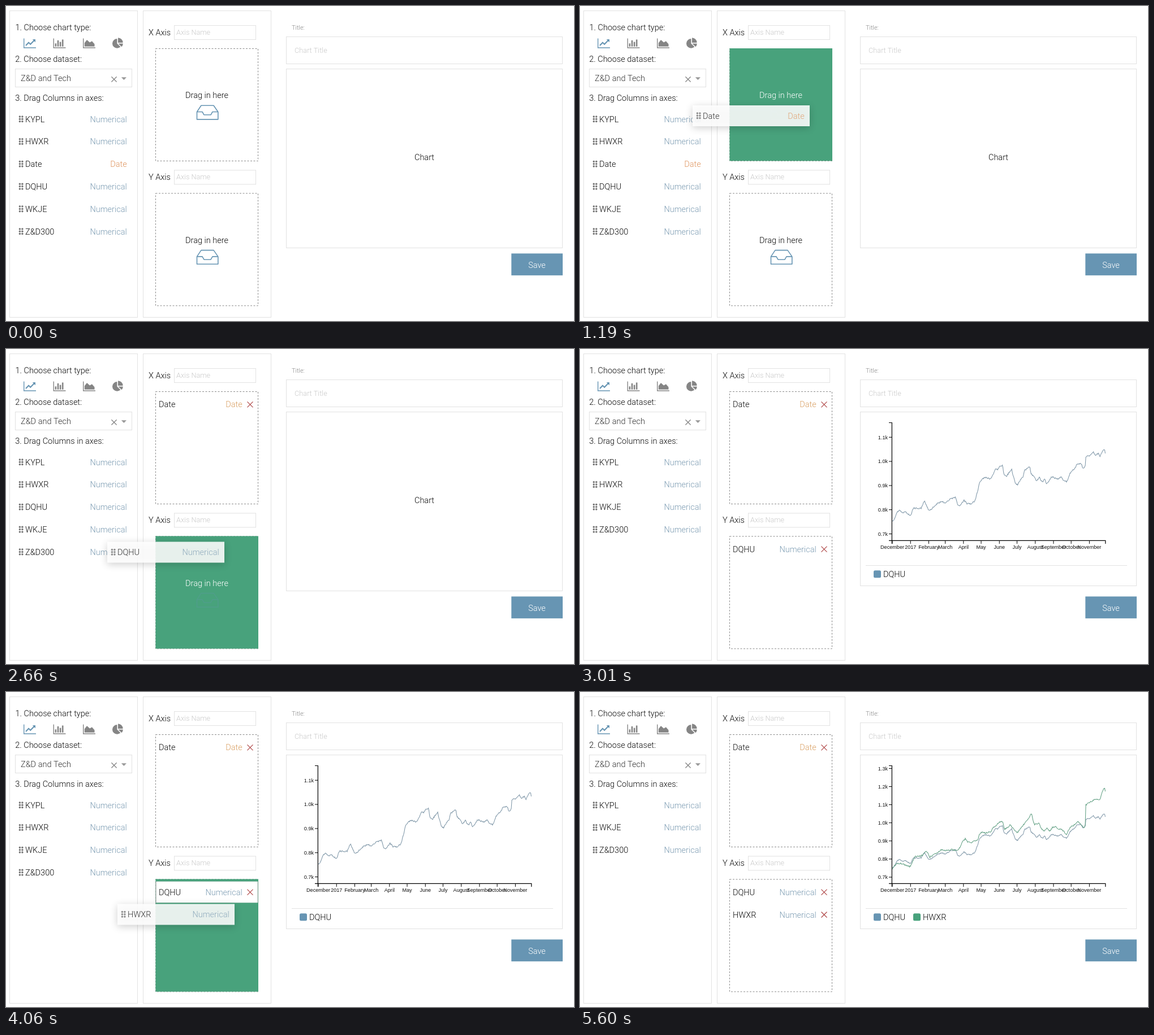
These frames come from a looping animation (1004 px wide and 558 px high, 5.67 s). An HTML page with a canvas:

```html
<!DOCTYPE html>
<html lang="en">
<head>
<meta charset="utf-8">
<title>Chart builder</title>
<style>
  html, body { margin: 0; width: 100%; height: 100%; overflow: hidden; background: #fff; }
  canvas { display: block; width: 1004px; height: 558px; }
</style>
</head>
<body>
<canvas id="stage" width="1004" height="558"></canvas>
<script>
const LOOP = 5670, STEP = 70;
const BLUE = '#6795b3', GREEN = '#48a27c', GRAY = '#858585', LINE = '#e2e2e2', INK = '#0c0c0c';
const NUM = '#7b9bb2', DATE = '#df955f', HINT = '#c9c9c9';
const ctx = document.getElementById('stage').getContext('2d');

const columns = ['KYPL', 'HWXR', 'Date', 'DQHU', 'WKJE', 'Z&D300'];
const ROW = { x: 16, y: 200.5, pitch: 39.8, w: 207, h: 37 };

// path: time, left, row centre; enter: drop zone lights up; drop: preview goes; done: data updates
const drags = [
  { name: 'Date', zone: 0, enter: 1050, drop: 1470, done: 1540,
    path: [[910, 16, 280], [1050, 112, 238], [1190, 199, 194.5], [1330, 234, 172], [1470, 242, 168]] },
  { name: 'DQHU', zone: 1, enter: 2520, drop: 2870, done: 2940,
    path: [[2240, 16, 280], [2380, 56, 300], [2520, 128, 336], [2660, 179, 360], [2800, 222, 388], [2870, 228, 392]] },
  { name: 'HWXR', zone: 1, enter: 3920, drop: 4340, done: 4480,
    path: [[3570, 16, 240.5], [3710, 56, 278], [3850, 112, 324.5], [3990, 176, 376], [4130, 218, 412], [4340, 230, 420]] }
];

// Curve points: x, y inside the plot
const blueCurve = [
  552,306, 556,300, 560,289, 565,286, 570,290, 576,289, 582,294, 584,296, 589,282, 603,282, 609,268, 613,279,
  617,287, 625,280, 633,273, 640,270, 646,273, 653,267, 664,262, 667,275, 671,278, 679,268, 684,274, 691,274,
  698,270, 703,251, 706,238, 711,231, 716,227, 725,230, 730,223, 734,212, 738,214, 743,207, 747,206, 749,222,
  754,225, 763,213, 766,226, 769,236, 773,241, 778,232, 783,226, 786,215, 795,208, 797,220, 801,225, 807,233,
  812,228, 817,236, 821,230, 825,239, 834,226, 840,229, 847,230, 850,226, 855,233, 861,235, 866,220, 870,216,
  875,211, 879,203, 886,203, 889,211, 893,209, 894,191, 903,188, 907,182, 911,188, 916,185, 919,190, 927,176, 929,189];
const greenCurve = [
  552,315, 556,308, 561,303, 568,304, 574,306, 580,309, 584,309, 588,300, 592,292, 600,291, 606,289, 610,283,
  615,284, 618,293, 624,288, 631,285, 640,279, 648,281, 656,279, 665,281, 669,279, 673,273, 676,266, 681,260,
  685,265, 691,267, 697,264, 703,262, 706,252, 711,248, 717,250, 726,247, 731,240, 736,237, 740,231, 747,229,
  750,243, 756,240, 760,236, 765,241, 773,249, 778,243, 782,238, 787,231, 792,225, 798,215, 801,228, 804,235,
  811,232, 815,242, 820,246, 826,241, 830,247, 835,240, 841,238, 846,243, 851,243, 860,252, 866,240, 873,236,
  880,230, 886,235, 890,240, 893,238, 894,200, 899,196, 905,194, 910,190, 916,190, 919,190, 923,177, 927,169, 929,180];

const clamp = v => Math.max(0, Math.min(1, v));

function at(points, x) {
  let i = 0;
  while (i < points.length - 2 && points[i + 1][0] < x) i++;
  const a = points[i], b = points[i + 1], k = clamp((x - a[0]) / (b[0] - a[0]));
  return a.map((v, j) => v + (b[j] - v) * k);
}

// Daily samples as values in thousands, with a little market noise
function series(flat, base, perUnit, seed) {
  const points = [], out = [];
  for (let i = 0; i < flat.length; i += 2) points.push([flat[i], flat[i + 1]]);
  for (let x = 552; x <= 929; x += 1.04) {
    seed = (seed * 16807) % 2147483647;
    const noise = (seed / 2147483647 - 0.5) * 2.4;
    out.push([x, 0.7 + (base - at(points, x)[1] - noise) / perUnit]);
  }
  return out;
}
const blueData = series(blueCurve, 327.5, 428, 41);
const greenData = series(greenCurve, 328, 321, 77);

function text(s, x, mid, color = INK, size = 14.5, align = 'left', font = '300 $px Roboto, sans-serif') {
  ctx.font = font.replace('$', size);
  ctx.fillStyle = color;
  ctx.textAlign = align;
  ctx.fillText(s, x, mid + size * 0.355);
}

function box(x, y, w, h, color = LINE) {
  ctx.strokeStyle = color;
  ctx.lineWidth = 1;
  ctx.strokeRect(x + 0.5, y + 0.5, w, h);
}

function rect(x, y, w, h, color) {
  ctx.fillStyle = color;
  ctx.fillRect(x, y, w, h);
}

function trace(points, close) {
  ctx.beginPath();
  points.forEach(([x, y]) => ctx.lineTo(x, y));
  if (close) ctx.closePath();
}

function stroke(points, color, width = 1) {
  trace(points);
  ctx.strokeStyle = color;
  ctx.lineWidth = width;
  ctx.stroke();
}

function fill(points, color) {
  trace(points, true);
  ctx.fillStyle = color;
  ctx.fill();
}

function cross(x, y, r, color, width) {
  stroke([[x - r, y - r], [x + r, y + r]], color, width);
  stroke([[x - r, y + r], [x + r, y - r]], color, width);
}

function wedge(x, y, r, from, to) {
  ctx.beginPath();
  ctx.moveTo(x, y);
  ctx.arc(x, y, r, from * Math.PI, to * Math.PI);
  ctx.fill();
}

function chartIcons() {
  [[31, BLUE], [83.5, GRAY], [136, GRAY]].forEach(([x, c]) => stroke([[x + 0.7, 57.5], [x + 0.7, 74], [x + 22, 74]], c, 1.4));
  stroke([[35, 70], [40, 64.8], [43.2, 67.8], [50, 60.8]], BLUE, 2.1);
  fill([[46.8, 59], [52, 59], [52, 64.2]], BLUE);
  [5.5, 11, 8.2, 12.4].forEach((h, i) => rect(86.6 + i * 4.1, 71.8 - h, 2.6, h, GRAY));
  fill([[138.8, 71.8], [138.8, 65.5], [143, 60], [148, 64.5], [152, 62.3], [156.5, 67.5], [156.5, 71.8]], GRAY);
  ctx.fillStyle = GRAY;
  wedge(196.4, 66.4, 8.4, 0.25, 1.5);
  wedge(198.4, 66.4, 8.4, 0, 0.25);
  wedge(198, 64.9, 8.6, 1.5, 2);
}

function tray(y, alpha) {
  ctx.globalAlpha = alpha;
  ctx.lineJoin = 'round';
  stroke([[337.5, y + 12], [345, y + 0.7], [367, y + 0.7], [374.8, y + 12], [374.8, y + 25.4], [337.5, y + 25.4],
    [337.5, y + 12], [347, y + 12], [350, y + 17.3], [362, y + 17.3], [365, y + 12], [374.8, y + 12]], BLUE, 1.6);
  ctx.lineJoin = 'miter';
  ctx.globalAlpha = 1;
}

function columnRow(name, x, mid) {
  ctx.fillStyle = '#777';
  for (let i = 0; i < 6; i++) {
    ctx.beginPath();
    ctx.arc(x + 8.4 + (i % 2) * 4.5, mid - 4.6 + (i >> 1) * 4.3, 1.75, 0, 7);
    ctx.fill();
  }
  const isDate = name === 'Date';
  text(name, x + 18, mid);
  text(isDate ? 'Date' : 'Numerical', x + 197.7, mid, isDate ? DATE : NUM, 14.5, 'right');
}

function leftPanel(used) {
  box(6, 8, 226, 543);
  text('1. Choose chart type:', 16.5, 37.5);
  chartIcons();
  text('2. Choose dataset:', 16.2, 93.7);
  box(16, 111, 206, 32);
  text('Z&D and Tech', 26, 128, '#333');
  cross(191, 129.8, 4.6, '#8a8a8a', 1.4);
  fill([[203.8, 126.3], [213, 126.3], [208.4, 131]], '#999');
  text('3. Drag Columns in axes:', 16.2, 163.3);
  columns.filter(c => !used.includes(c)).forEach((c, i) => columnRow(c, ROW.x, ROW.y + i * ROW.pitch));
}

function zone(label, y, items, hover) {
  text(label, 252, y - 28.5);
  box(297, y - 41, 144, 25);
  text('Axis Name', 301, y - 28.8, HINT, 12.7);

  ctx.setLineDash([3, 2.5]);
  box(264, y, 181, 199, '#8c8c8c');
  ctx.setLineDash([]);
  ctx.globalAlpha = clamp(hover / 100);
  rect(264.4, y, 181.6, 199.4, GREEN);
  ctx.globalAlpha = 1;

  if (!items.length) {
    text('Drag in here', 355, y + 83, hover > 0 ? '#fff' : INK, 14.5, 'center');
    tray(y + 100.5, 1 - clamp(hover / 190));
  }
  items.forEach((name, i) => {
    const mid = y + 23.3 + i * 39.8, isDate = name === 'Date';
    if (hover > 0) {
      rect(264.5, mid - 19, 181, 37.5, '#9a9a9a');
      rect(265.5, mid - 19, 179.3, 37.5, '#fff');
    }
    text(name, 270, mid);
    text(isDate ? 'Date' : 'Numerical', 417.7, mid, isDate ? '#d99f62' : NUM, 14.5, 'right');
    cross(431.5, mid, 5, '#b04848', 1.2);
  });
}

function chart(lines) {
  const two = lines.length > 1, base = two ? 328 : 327.5, unit = two ? 321 : 428;
  const yOf = v => base - (v - 0.7) * unit;
  const label = (s, x, y, align) => text(s, x, y, '#111', 9.1, align, '$px "Liberation Sans", Arial, sans-serif');

  lines.forEach(l => stroke(l.data.map(([x, v]) => [x, yOf(v)]), l.line, 1.05));

  stroke([[546, 130.5], [551.4, 130.5], [551.4, 339.4], [546, 339.4]], '#000', 1.2);
  stroke([[551.4, 345], [551.4, 339.4], [928.8, 339.4], [928.8, 345]], '#000', 1.2);
  for (let i = 7; i <= (two ? 13 : 11); i++) {
    const y = yOf(i / 10);
    stroke([[546, y], [551.4, y]], '#000');
    label((i / 10).toFixed(1) + 'k', 544, y, 'right');
  }
  let day = 0;
  [['December', 31], ['2017', 31], ['February', 28], ['March', 31], ['April', 30], ['May', 31], ['June', 30],
    ['July', 31], ['August', 31], ['September', 30], ['October', 31], ['November', 30]].forEach(([name, days]) => {
    const x = 552 + day * 1.04;
    stroke([[x, 339.4], [x, 345]], '#000');
    label(name, x, 350.8, 'center');
    day += days;
  });

  stroke([[505, 383.5], [967, 383.5]], LINE);
  lines.forEach((l, i) => {
    ctx.fillStyle = l.color;
    ctx.beginPath();
    ctx.roundRect(519 + i * 70, 392.3, 13, 13, 2.5);
    ctx.fill();
    text(l.name, 536 + i * 70, 399);
  });
}

function rightPanel(items) {
  text('Title:', 505, 38, '#858585', 10.9);
  box(495, 54, 488, 48);
  text('Chart Title', 510, 78, HINT, 12.7);
  const lines = [
    { name: 'DQHU', data: blueData, line: '#7f97a8', color: BLUE },
    { name: 'HWXR', data: greenData, line: '#62a084', color: GREEN }
  ].filter(l => items.includes(l.name));
  box(495, 111, 488, lines.length ? 308 : 317);
  if (lines.length) chart(lines);
  else text('Chart', 739.5, 267.5, INK, 14.5, 'center');
  rect(893.3, 438.4, 90.7, 38.8, BLUE);
  text('Save', 938.5, 458.7, '#fff', 14.5, 'center');
}

function preview(name, x, mid) {
  ctx.save();
  ctx.shadowColor = 'rgba(0,0,0,.22)';
  ctx.shadowBlur = 14;
  ctx.shadowOffsetY = 3;
  rect(x, mid - ROW.h / 2, ROW.w, ROW.h, 'rgba(255,255,255,.88)');
  ctx.restore();
  ctx.globalAlpha = 0.82;
  columnRow(name, x, mid);
  ctx.globalAlpha = 1;
}

function draw(t) {
  const done = drags.filter(d => t >= d.done);
  const active = drags.find(d => t >= d.path[0][0] && t < d.done);
  const itemsIn = z => done.filter(d => d.zone === z).map(d => d.name);
  const hoverOn = z => active && active.zone === z && t >= active.enter ? t - active.enter + 1 : 0;

  rect(0, 0, 1004, 558, '#fff');
  leftPanel(done.map(d => d.name));
  box(242, 8, 226, 543);
  zone('X Axis', 75, itemsIn(0), hoverOn(0));
  zone('Y Axis', 331.4, itemsIn(1), hoverOn(1));
  rightPanel(itemsIn(1));
  if (active && t < active.drop) {
    const [, x, mid] = at(active.path, t);
    preview(active.name, x, mid);
  }
}

function tick() {
  const t = performance.now() % LOOP;
  draw(Math.floor(t / STEP) * STEP);
  requestAnimationFrame(tick);
}
tick();
</script>
</body>
</html>
```
